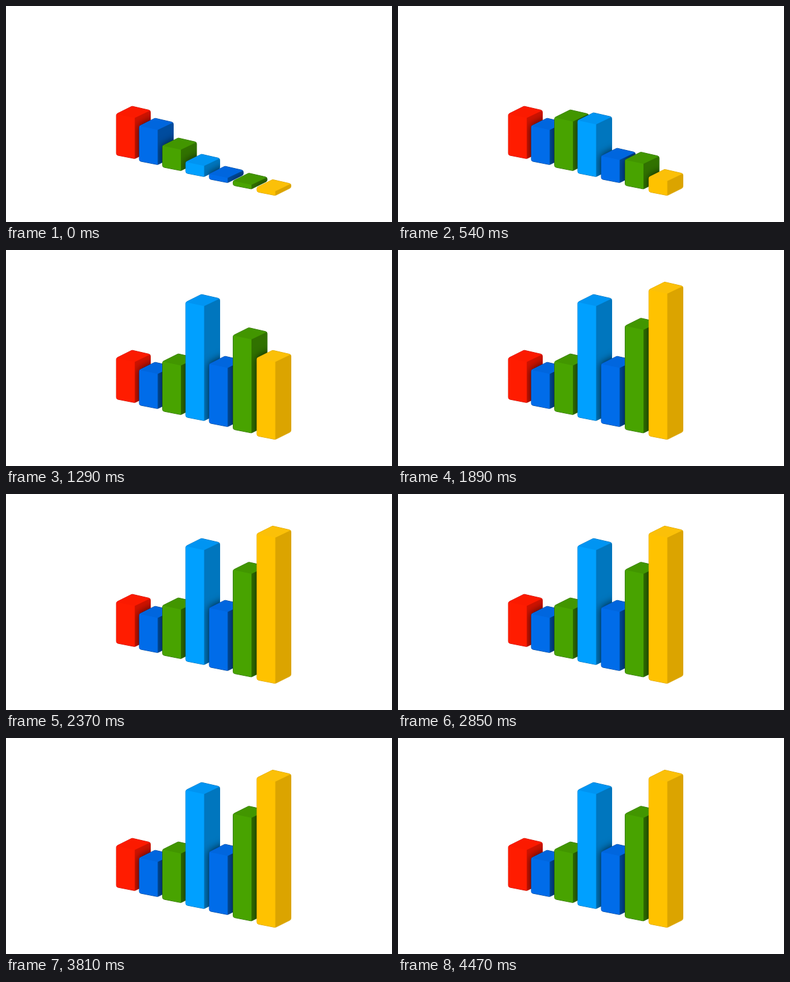
Animation, 640 px wide and 360 px high, one loop 4500 ms. Source, as an HTML page with a canvas:

```html
<!DOCTYPE html>
<html lang="en">
<head>
<meta charset="utf-8">
<title>Growing bars</title>
<style>
  html, body { margin: 0; width: 100%; height: 100%; overflow: hidden; background: #fff; }
  canvas { display: block; }
</style>
</head>
<body>
<canvas id="stage" width="640" height="360"></canvas>
<script>
const ctx = document.getElementById('stage').getContext('2d');
const LOOP = 4500;

// Colours: front, top, side
const RED = ['#ff1c00', '#fb1a00', '#cf1300'];
const BLUE = ['#006ce9', '#0066de', '#004c9e'];
const GREEN = ['#48a300', '#429600', '#317200'];
const SKY = ['#00a0ff', '#0094f2', '#0076be'];
const GOLD = ['#ffc200', '#fbc008', '#dba400'];

// x: left edge, y: foot of the front corner, keys: [time, height]
const bars = [
  { x: 183, y: 254.5, colors: RED, keys: [[0, 68]] },
  { x: 221, y: 264.5, colors: BLUE, keys: [[0, 58]] },
  { x: 259.5, y: 274.5, colors: GREEN, keys: [[-400, 7], [0, 35], [480, 82]] },
  { x: 298, y: 284.5, colors: SKY, keys: [[-250, 7], [0, 18], [540, 87], [1050, 178], [1230, 191]] },
  { x: 337, y: 294.5, colors: BLUE, keys: [[-100, 7], [0, 8], [540, 38], [1200, 98]] },
  { x: 376.5, y: 305, colors: GREEN, keys: [[0, 7], [540, 42], [1290, 156], [1560, 172]] },
  { x: 416, y: 315.8, colors: GOLD, keys: [[0, 7], [540, 24], [1290, 129], [1620, 212], [1800, 243]] }
];

// Smooth monotone curve through the keys, flat at both ends
function heightAt(keys, t) {
  const last = keys.length - 1;
  if (t >= keys[last][0]) return keys[last][1];
  const slope = i => (keys[i + 1][1] - keys[i][1]) / (keys[i + 1][0] - keys[i][0]);
  const tangent = i => {
    if (i === 0 || i === last) return 0;
    const a = slope(i - 1), b = slope(i);
    return 2 * a * b / (a + b);
  };
  const i = keys.findIndex((key, n) => n < last && t < keys[n + 1][0]);
  const [t0, h0] = keys[i], [t1, h1] = keys[i + 1];
  const d = t1 - t0, u = (t - t0) / d, v = 1 - u;
  return h0 * v * v * (1 + 2 * u) + h1 * u * u * (3 - 2 * u)
    + d * u * v * (v * tangent(i) - u * tangent(i + 1));
}

function cornersAt({ x, y, keys }, t) {
  const roof = y - heightAt(keys, t), mid = x + 30.5, right = x + 56.5;
  return {
    leftTop: [x, roof - 6.5], midTop: [mid, roof], rightTop: [right, roof - 12.5],
    back: [x + 26, roof - 19.5],
    leftFoot: [x, y - 6], midFoot: [mid, y], rightFoot: [right, y - 13]
  };
}

const outline = c => [c.leftTop, c.back, c.rightTop, c.rightFoot, c.midFoot, c.leftFoot];

function fillFace(points, color) {
  ctx.beginPath();
  points.forEach(p => ctx.lineTo(...p));
  ctx.closePath();
  ctx.fillStyle = color;
  ctx.fill();
}

function roundedPath(points, radius) {
  const n = points.length, [a, b] = [points[n - 1], points[0]];
  ctx.beginPath();
  ctx.moveTo((a[0] + b[0]) / 2, (a[1] + b[1]) / 2);
  points.forEach((p, i) => ctx.arcTo(...p, ...points[(i + 1) % n], radius));
  ctx.closePath();
}

// The next bar darkens the side it stands against
function drawBar(bar, next, t) {
  const [front, top, side] = bar.colors;
  const c = cornersAt(bar, t), hull = outline(c);

  ctx.save();
  roundedPath(hull, 3.5);
  ctx.strokeStyle = side;
  ctx.lineWidth = 1;
  ctx.stroke();
  ctx.clip();
  fillFace(hull, side);
  if (next) {
    ctx.shadowColor = 'rgba(0, 0, 0, .75)';
    ctx.shadowBlur = 14;
    fillFace(outline(cornersAt(next, t)), next.colors[0]);
    ctx.shadowColor = 'transparent';
  }
  fillFace([c.leftTop, c.back, c.midTop, c.midFoot, c.leftFoot], front);
  fillFace([c.leftTop, c.back, c.rightTop, c.midTop], top);
  ctx.restore();
}

function render(now) {
  const t = now % LOOP;
  ctx.clearRect(0, 0, 640, 360);
  bars.forEach((bar, i) => drawBar(bar, bars[i + 1], t));
}

const start = performance.now();
function tick() {
  render(performance.now() - start);
  requestAnimationFrame(tick);
}
tick();
</script>
</body>
</html>
```
